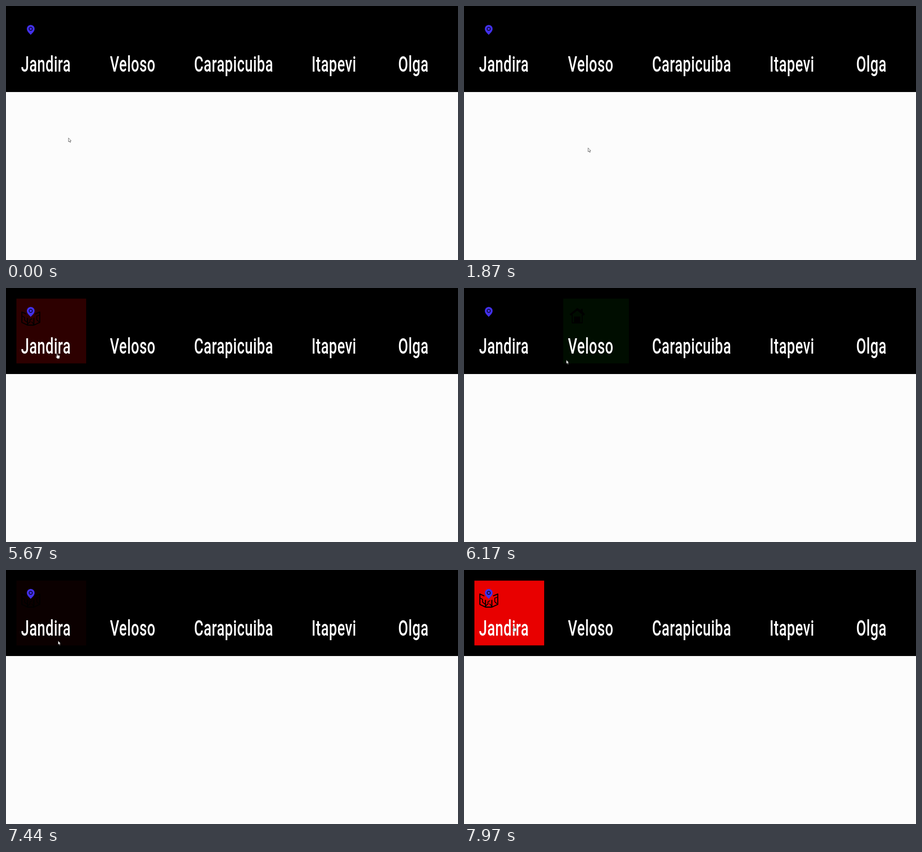
An HTML page that plays this animation: 998 px wide and 561 px high, repeating every 8 s.

```html
<!DOCTYPE html>
<html lang="pt">
<head>
<meta charset="utf-8">
<title>Station menu</title>
<style>
  html, body { margin: 0; width: 100%; height: 100%; overflow: hidden; background: #fcfcfc; }
  svg { display: block; width: 100vw; height: 100vh; }
  .label {
    font: 500 49px Roboto, "Liberation Sans", sans-serif;
    letter-spacing: .9px;
    fill: #fff;
    transform: scaleX(.645);
  }
  .card, .pointer, .arrow, .hand { animation: 8s linear infinite; }
  .red { animation-name: red; }
  .green { animation-name: green; }
  .pointer { animation-name: move; }
  .arrow { animation-name: arrow; animation-timing-function: step-end; }
  .hand { animation-name: hand; animation-timing-function: step-end; }
  .line { fill: none; stroke: #000; stroke-width: 2.3; stroke-linejoin: round; stroke-linecap: round; }
  .thin { stroke-width: 1.8; }

  @keyframes red {
    0%, 70% { opacity: 0; }
    71% { opacity: .2; }
    72.5% { opacity: .5; }
    74% { opacity: .3; }
    75.5%, 92.5% { opacity: 0; }
    93% { opacity: .043; }
    95% { opacity: .6; }
    97% { opacity: .8; }
    99.6%, 100% { opacity: .91; }
  }
  @keyframes green {
    0%, 76.7% { opacity: 0; }
    77.1% { opacity: .09; }
    79% { opacity: .6; }
    80.3% { opacity: .75; }
    82% { opacity: .4; }
    85.8%, 100% { opacity: 0; }
  }
  @keyframes move {
    0%, .4% { transform: translate(138px, 291px); }
    5% { transform: translate(129px, 304px); }
    10.4% { transform: translate(125px, 316px); }
    11.25%, 16.25% { transform: translate(125px, 317px); }
    17%, 20.4% { transform: translate(274px, 343px); }
    23.37%, 54.9% { transform: translate(274px, 313px); }
    55% { transform: translate(272px, 299.5px); }
    57% { transform: translate(500px, 262px); }
    60% { transform: translate(860px, 228px); }
    62% { transform: translate(988px, 218px); }
    65% { transform: translate(785px, 300px); }
    65.5% { transform: translate(775px, 315px); }
    68% { transform: translate(400px, 262px); }
    70% { transform: translate(120px, 170px); }
    71% { transform: translate(108px, 140px); }
    72.5% { transform: translate(130px, 150px); }
    73.8% { transform: translate(170px, 185px); }
    75.5% { transform: translate(205px, 185px); }
    77.1% { transform: translate(225px, 159px); }
    78.8% { transform: translate(262px, 128px); }
    80.5% { transform: translate(274px, 185px); }
    83% { transform: translate(262px, 404px); }
    86.2% { transform: translate(274px, 344px); }
    90% { transform: translate(220px, 270px); }
    92.6% { transform: translate(126px, 172px); }
    93% { transform: translate(115px, 156px); }
    95% { transform: translate(108px, 131px); }
    97% { transform: translate(107px, 125px); }
    99.6%, 100% { transform: translate(106px, 123px); }
  }
  @keyframes arrow {
    0% { opacity: 1; }
    70.8% { opacity: 0; }
    72.4% { opacity: 1; }
    78.3% { opacity: 0; }
    79.4% { opacity: 1; }
    94%, 100% { opacity: 0; }
  }
  @keyframes hand {
    0% { opacity: 0; }
    70.8% { opacity: 1; }
    72.4% { opacity: 0; }
    78.3% { opacity: 1; }
    79.4% { opacity: 0; }
    94%, 100% { opacity: 1; }
  }
</style>
</head>
<body>
<svg viewBox="0 0 998 561" preserveAspectRatio="none">
  <rect width="998" height="561" fill="#fcfcfc"/>
  <rect width="998" height="190"/>

  <g class="card red">
    <rect x="23" y="23.5" width="154" height="143" fill="#f00"/>
    <!-- folded map -->
    <path class="line" d="M44 57L35 53V76L47.5 82H61.5L74.5 76V53L65 57M47.5 67V82M61.5 67V82"/>
    <path class="line thin" d="M36 62L41 65V71L46 75M48 79L53 75V70L57 68M57 75L61 80M74 60L68 62V70L72 74"/>
  </g>

  <g class="card green">
    <rect x="219" y="23.5" width="145" height="143" fill="#008000"/>
    <!-- house -->
    <path d="M250 44L258 49V46H262V52L267 58L264 61L250 50L236 61L233 58Z"/>
    <path d="M243 63H257V78H243Z"/>
    <path class="line" d="M239 60V77H261V60"/>
  </g>

  <path d="M54.6 63.8C51 60 46 56 46 50.3A8.6 8.6 0 0 1 63.2 50.3C63.2 56 58.2 60 54.6 63.8Z" fill="#4230ea"/>
  <circle cx="54.6" cy="50.5" r="3.5" fill="#4230ea" stroke="#050318" stroke-width="1.6"/>

  <g transform="translate(33.3 145.3)"><text class="label">Jandira</text></g>
  <g transform="translate(229.5 145.3)"><text class="label">Veloso</text></g>
  <g transform="translate(415.3 145.3)"><text class="label">Carapicuiba</text></g>
  <g transform="translate(674.8 145.3)"><text class="label">Itapevi</text></g>
  <g transform="translate(866 145.3)"><text class="label">Olga</text></g>

  <g class="pointer" fill="#fff" stroke="#222" stroke-width=".7" stroke-linejoin="round">
    <path class="arrow" d="M0 .5V9L2 7.3L3.4 10.3L4.8 9.7L3.5 6.8H6Z"/>
    <path class="hand" d="M2.5 8.5V1.4Q3.3 0 4.2 1.4V5L8.6 5.8Q9.6 6.2 9.4 8L8.6 12.8H3.9L.4 8.5Q.5 6.9 2.5 8.5Z"/>
  </g>
</svg>
</body>
</html>
```
